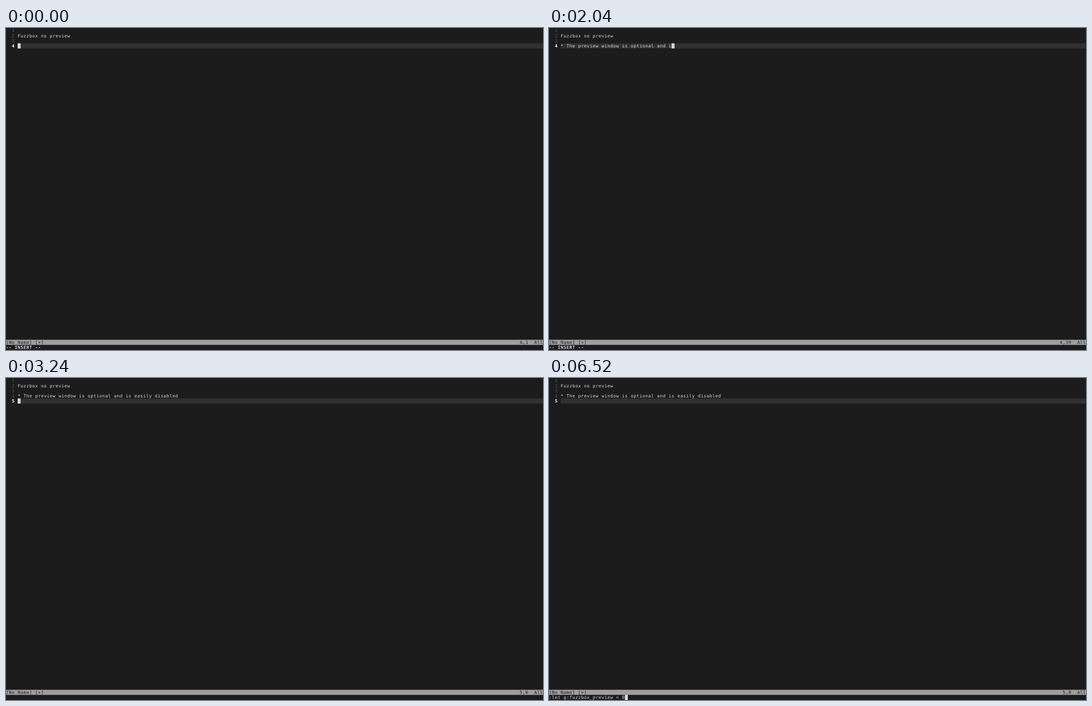
Recreate the animation shown at these times as an HTML page with a canvas. Size 966 by 580 pixels, loop 8 s.

```html
<!DOCTYPE html>
<html lang="en">
<head>
<meta charset="utf-8">
<title>Editor session</title>
<style>
  html, body { margin: 0; height: 100%; overflow: hidden; background: #1c1c1c; }
  canvas { display: block; }
</style>
</head>
<body>
<canvas id="screen" width="966" height="580"></canvas>
<script>
const ctx = document.getElementById('screen').getContext('2d');
const COLS = 184, ROWS = 63, LOOP = 8000, TICK = 40;
const CELL_W = 966 / COLS, CELL_H = 580 / ROWS;
const GUTTER = 4;
const FONT = '7.9px "DejaVu Sans Mono", monospace';
const BG = '#1c1c1c', FG = '#dadada', DIM = '#585858', LINE = '#303030', BAR = '#9e9e9e';

const NOTE = '* The preview window is optional and is easily disabled';
const COMMAND = ':let g:fuzzbox_preview = 0';
const ESCAPE_AT = 3240, COLON_AT = 5120, PROMPT_AT = 5160;

// Keys pressed by time t when the first lands at `start`
const keys = (t, start, interval) => Math.max(0, Math.floor((t - start) / interval) + 1);

function fill(col, row, width, color) {
  ctx.fillStyle = color;
  ctx.fillRect(col * CELL_W, row * CELL_H, width * CELL_W, CELL_H);
}

function print(text, col, row, color = FG, bold = false) {
  ctx.font = (bold ? 'bold ' : '') + FONT;
  ctx.fillStyle = color;
  [...text].forEach((ch, i) => ctx.fillText(ch, (col + i) * CELL_W, row * CELL_H + 7.3));
}

function draw(t) {
  const typed = keys(t, 14, 54.5);
  const entered = typed > NOTE.length;
  const note = NOTE.slice(0, typed);
  const insert = t < ESCAPE_AT;
  const command = t < COLON_AT ? '' : COMMAND.slice(0, Math.max(1, keys(t, 5128, 55.5)));
  const lines = ['', 'Fuzzbox no preview', '', note];
  if (entered) lines.push('');
  const current = lines.length - 1;
  const column = lines[current].length;

  ctx.fillStyle = BG;
  ctx.fillRect(0, 0, 966, 580);
  fill(GUTTER, current, COLS - GUTTER, LINE);
  lines.forEach((line, row) => {
    const active = row === current;
    print(String(row + 1), 2, row, active ? '#fff' : DIM, active);
    print(line, GUTTER, row);
  });

  const bar = ROWS - 2, prompt = ROWS - 1;
  const ruler = `${current + 1},${insert ? column + 1 : 0}`;
  fill(0, bar, COLS, BAR);
  print('[No Name] [+]', 0, bar, BG);
  print(ruler, 179 - ruler.length, bar, BG);
  print('All', 181, bar, BG);

  if (insert) print('-- INSERT --', 0, prompt, FG, true);
  print(command, 0, prompt);
  if (t < PROMPT_AT) fill(GUTTER + column, current, 1, FG);
  else fill(command.length, prompt, 1, FG);
}

function frame() {
  const t = performance.now() % LOOP;
  draw(Math.floor(t / TICK) * TICK);
  requestAnimationFrame(frame);
}
frame();
</script>
</body>
</html>
```
